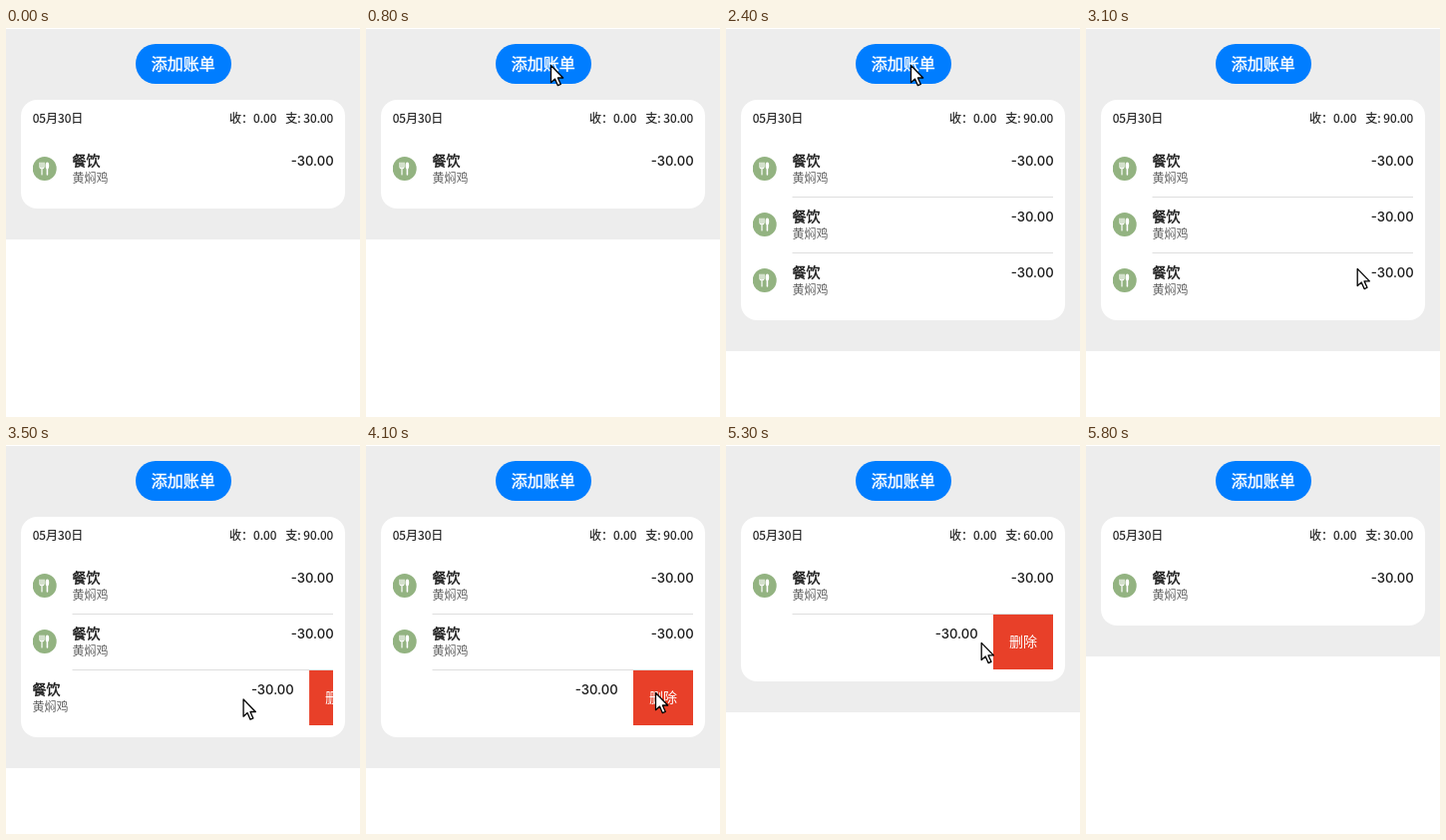
Animation, 355 px wide and 390 px high, one loop 6300 ms. Source, as an HTML page:

```html
<!DOCTYPE html>
<html lang="zh-CN">
<head>
<meta charset="utf-8">
<title>账单</title>
<style>
  html, body { margin: 0; width: 100%; height: 100%; overflow: hidden; background: #fff; }
  svg { display: block; width: 355px; height: 390px; }
  text { font: 12px "Noto Sans CJK SC", "Noto Sans CJK JP", sans-serif; fill: #1a1a1a; white-space: pre; }
  .head { stroke: #1a1a1a; stroke-width: .15; }
  .add { font-size: 16px; fill: #fff; stroke: #fff; stroke-width: .4; text-anchor: middle; }
  .title { font-size: 14px; stroke: #1a1a1a; stroke-width: .45; }
  .note { fill: #5e5e5e; }
  .sum { font: 500 13.1px Inter, "Noto Sans", sans-serif; text-anchor: end; }
  .end { text-anchor: end; }
  .del { font-size: 14px; fill: #fff; text-anchor: middle; }
</style>
</head>
<body>
<svg viewBox="0 0 355 390">
  <defs>
    <clipPath id="rowClip"><rect x="27" y="0" width="301" height="56"/></clipPath>
    <g id="item">
      <circle cx="38.7" cy="28" r="12" fill="#93b381"/>
      <path d="M34 22v4.5q0 1.5 2 1.5t2-1.5V22M36 22v12" fill="none" stroke="#fff" stroke-width="1.2" stroke-linecap="round"/>
      <ellipse cx="41.4" cy="25" rx="1.8" ry="3.4" fill="#fff"/>
      <path d="M41.4 26v8" stroke="#fff" stroke-width="1.6" stroke-linecap="round"/>
      <text class="title" x="66.5" y="25.3">餐饮</text>
      <text class="note" x="66.5" y="42">黄焖鸡</text>
      <text class="sum" x="328.6" y="25">-30.00</text>
      <rect x="344" width="60" height="56" fill="#e84029"/>
      <text class="del" x="374" y="33.3">删除</text>
    </g>
  </defs>

  <rect id="page" y="1" width="355" fill="#ededed"/>
  <rect id="button" x="130" y="16" width="96" height="40" rx="20"/>
  <text class="add" x="177.7" y="42">添加账单</text>

  <rect id="card" x="15" y="72" width="325" rx="16" fill="#fff"/>
  <text class="head" x="26.7" y="94.6">05月30日</text>
  <text class="head end" x="271.3" y="94.6">收：0.00</text>
  <text class="head end" id="total" x="328.3" y="94.6"></text>

  <g id="rows"></g>
  <path id="lines" fill="none" stroke="#dedede"/>
  <path id="cursor" d="M0 0V17.2L4 13.6L6.9 20.2L9.8 18.9L6.9 12.5H12.2Z"
        fill="#fff" stroke="#000" stroke-width="1.3" stroke-linejoin="round"/>
</svg>

<script>
const LOOP = 6300, STEP = 100, ROW = 56, TOP = 113;
const PULL = 76, DRAG = 600;
const $ = id => document.getElementById(id);

const presses = [
  { down: 1500, add: 1700, up: 1800 },
  { down: 2200, add: 2300, up: 2400 }
];

// Each swipe grabs the last row at (x, y) and ends with its removal.
const swipes = [
  { from: 2600, grab: 3190, removed: 4300, x: 278, y: 255 },
  { from: 4300, grab: 4582, removed: 5500, x: 289.5, y: 202 }
];

const enter = { x: 290, y: 352 };
const moves = [
  { from: 300, to: 800, x: 185.5, y: 37.5 },
  ...swipes.flatMap(({ from, grab, x, y }) => [
    { from, to: grab, x, y },
    { from: grab, to: grab + DRAG, x: x - PULL, y },
    { from: grab + DRAG, to: grab + DRAG + 220, x: 290.5, y: y - 6.5 }
  ]),
  { from: 5450, to: 5800, x: 350, y: 310 }
];

// Smooth start and stop, 0 before and 1 after the span
function ease(t, from, to) {
  const u = Math.min(1, Math.max(0, (t - from) / (to - from)));
  return u * u * (3 - 2 * u);
}

function cursorAt(t) {
  return moves.reduce((p, m) => {
    const k = ease(t, m.from, m.to);
    return { x: p.x + (m.x - p.x) * k, y: p.y + (m.y - p.y) * k };
  }, enter);
}

function pullAt(t) {
  const s = swipes.find(s => t >= s.grab && t < s.removed);
  return s ? PULL * ease(t, s.grab, s.grab + DRAG) : 0;
}

$("rows").innerHTML = [0, 1, 2].map(i =>
  `<g transform="translate(0 ${TOP + i * ROW})" clip-path="url(#rowClip)"><use href="#item"/></g>`
).join("");
const rows = [...$("rows").children];

function draw(t) {
  const added = presses.filter(p => t >= p.add).length;
  const removed = swipes.filter(s => t >= s.removed).length;
  const last = added - removed;
  const pressed = presses.some(p => t >= p.down && t < p.up);

  $("page").setAttribute("height", 211 + last * ROW);
  $("card").setAttribute("height", 109 + last * ROW);
  $("button").setAttribute("fill", pressed ? "#0673ea" : "#007dff");
  $("total").textContent = `支: ${(last + 1) * 30}.00`;

  rows.forEach((row, i) => {
    row.style.display = i <= last ? "" : "none";
    row.firstChild.setAttribute("x", i === last ? -pullAt(t) : 0);
  });

  let lines = "";
  for (let i = 1; i <= last; i++) lines += `M66.5 ${TOP + i * ROW + 0.5}H328`;
  $("lines").setAttribute("d", lines);

  const { x, y } = cursorAt(t);
  $("cursor").style.display = t >= 300 && t < 5800 ? "" : "none";
  $("cursor").setAttribute("transform", `translate(${x} ${y})`);
}

const start = performance.now();
function tick() {
  const t = (performance.now() - start) % LOOP;
  draw(Math.floor(t / STEP) * STEP);
  requestAnimationFrame(tick);
}
tick();
</script>
</body>
</html>
```
